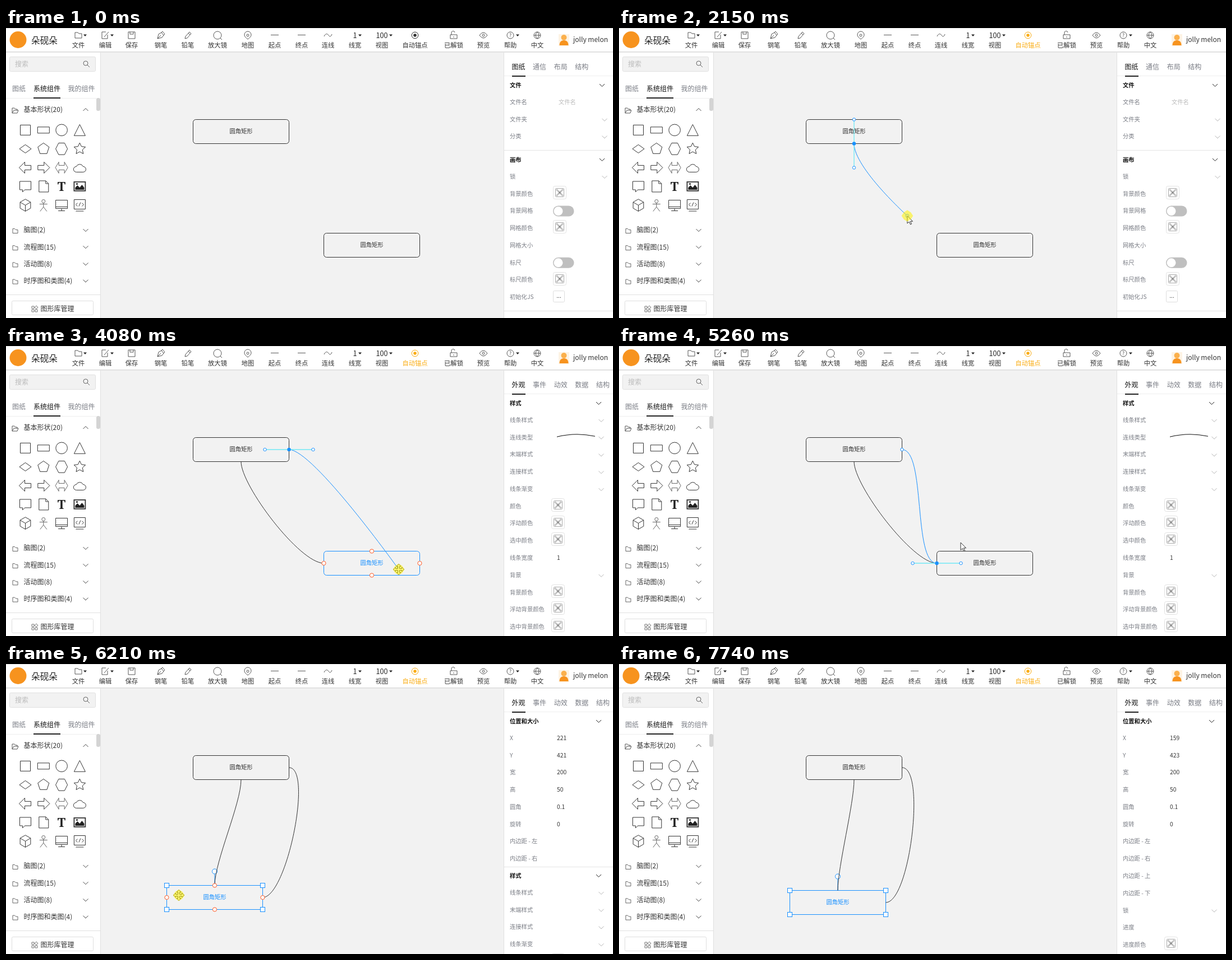
Write an HTML page that moves like this. It is 1082x518 px and loops after 8.75 s.

```html
<!DOCTYPE html>
<html lang="zh-CN">
<head>
<meta charset="utf-8">
<title>自动锚点</title>
<style>
html, body { margin: 0; width: 100%; height: 100%; overflow: hidden; background: #f2f2f2; }
svg { display: block; }
text { stroke: none; white-space: pre; font-family: "Noto Sans CJK SC", "Noto Sans CJK", "Open Sans", sans-serif; }
</style>
</head>
<body>
<svg width="1082" height="518" viewBox="0 0 1082 518" fill="none" stroke="#333">
  <g id="chrome"></g>
  <g id="stage"></g>
</svg>
<script>
const LOOP = 8750, BLUE = '#1890ff', RED = '#ff5a26', ORANGE = '#faad14', DARK = '#333', GREY = '#7a7d85';
const MID = 'text-anchor="middle"', BOLD = 'font-weight="700"';

// Drawing helpers, each returning SVG markup
const path = (d, x = 0, y = 0, extra = '') => `<path d="${d}" transform="translate(${x} ${y})" ${extra}/>`;
const text = (s, x, y, size = 10.3, fill = DARK, extra = '') =>
  `<text x="${x}" y="${y}" dy=".37em" font-size="${size}" fill="${fill}" ${extra}>${s}</text>`;
const rect = (x, y, w, h, fill, stroke = 'none', r = 0) =>
  `<rect x="${x}" y="${y}" width="${w}" height="${h}" rx="${r}" fill="${fill}" stroke="${stroke}"/>`;
const dot = (x, y, r, fill, stroke = 'none') => `<circle cx="${x}" cy="${y}" r="${r}" fill="${fill}" stroke="${stroke}"/>`;
const ring = r => `M${-r} 0a${r} ${r} 0 1 0 ${2 * r} 0a${r} ${r} 0 1 0 ${-2 * r} 0`;
const polygon = (n, rx, ry = rx, inner = 1, turn = -Math.PI / 2) =>
  'M' + Array.from({ length: n }, (_, i) => {
    const a = turn + i * 2 * Math.PI / n, k = i % 2 ? inner : 1;
    return `${(rx * k * Math.cos(a)).toFixed(2)} ${(ry * k * Math.sin(a)).toFixed(2)}`;
  }).join('L') + 'z';
const chevron = (x, y, color = '#222', up = 1) => path(`M-4.5 ${-2 * up}L0 ${2.5 * up}L4.5 ${-2 * up}`, x, y, `stroke="${color}"`);
const caret = x => path('M-3-1.5H3L0 2z', x, 13, 'fill="#222" stroke="none"');

function toolbar() {
  const tools = [
    ['文件', 129, 'M-6 5V-5H-1L1-3H6V5z', 141],
    ['编辑', 177, 'M4-1V6H-6V-6H1M-2 3L6-6', 189],
    ['保存', 224, 'M-6-6H6V6H-6zM-3-6V-2H3V-6'],
    ['钢笔', 276, 'M-6 6L-4-2L1-5L5 0L2 4zM-6 6L0 0M1-5L3-7L7-2L5 0'],
    ['铅笔', 324, 'M-5 6L-4 2L3-6L6-3L-1 5zM1-4L4-1'],
    ['放大镜', 377, ring(7) + 'M5 5L8 8'],
    ['地图', 431, 'M0 7C-4 4-6 2-6-1A6 6 0 0 1 6-1C6 2 4 4 0 7z' + ring(2)],
    ['起点', 479, 'M-7-.5H7'],
    ['终点', 527, 'M-7-.5H7'],
    ['连线', 574, 'M-7 2C-4-5 0-2 1 0S5 4 7-2'],
    ['线宽', 622, '', 631],
    ['视图', 670, '', 686],
    ['已解锁', 798, 'M-6-1H6V6H-6zM-4-1V-4A3 3 0 0 1 2-5M0 2V4'],
    ['预览', 851, 'M-7 0Q0-10 7 0Q0 10-7 0z' + ring(2)],
    ['帮助', 899, ring(6), 912],
    ['中文', 947, ring(6) + 'M-6 0H6M0-6Q-6 0 0 6Q6 0 0-6']
  ];
  return rect(0, 0, 1082, 43, '#fff') + rect(0, 0, 1082, 1, '#dcdcdc') + rect(0, 42, 1082, 1, '#d9d9d9') + rect(0, 43, 1082, 1, '#e8e8e8') +
    dot(21.5, 21, 15, '#f7931e') + text('朵砚朵', 45, 22, 15.7, '#222') +
    tools.map(([label, x, icon, arrow]) => text(label, x, 31.3, 11.3, DARK, MID) +
      path(icon, x, 13, 'stroke="#444" stroke-width=".9"') + (arrow ? caret(arrow) : '')).join('') +
    text('1', 622, 13.5, 12.6, '#222', MID) + text('100', 670, 13.5, 12.6, '#222', MID) + text('?', 899, 13, 8.5, '#444', MID) +
    rect(985, 11, 19, 21, '#fdf3e4') + dot(994.5, 17, 5, '#fbb04c') + path('M-8 10Q-8 1 0 1T8 10z', 994.5, 21, 'fill="#f7931e" stroke="none"') +
    text('jolly melon', 1011, 21, 12);
}

function shapeIcons() {
  const arrow = 'M11 0L1-10V-4H-10V4H1V10z';
  const icons = [
    'M-9-9H9V9H-9z', 'M-10.5-5.5H10.5V5.5H-10.5z', ring(10.3), 'M0-10L10 10H-10z',
    polygon(4, 10.5, 7.5), polygon(5, 10.5), polygon(6, 10.5, 12, 1, 0), polygon(10, 10.8, 10.8, .48),
    arrow, arrow, 'M-11 0L-5-10V-4H5V-10L11 0L5 10V4H-5V10z', 'M-6 8A5 5 0 0 1-6-2A6.5 6.5 0 0 1 6-2A5 5 0 0 1 6 8z',
    'M-10-9H10V6H-1L-5 10V6H-10z', 'M-8-10H4L9-5V10H-8zM4-10V-5H9', '', 'M-10-8H10V8H-10z',
    polygon(6, 10.8) + 'M-9.4-5.4L0 0L9.4-5.4M0 0V10.8', 'M-7-2H7M0-4V3L-6 11M0 3L6 11M-3-7' + 'a3 3 0 1 0 6 0a3 3 0 1 0-6 0',
    'M-10.5-9H10.5V6H-10.5zM-10.5 3H10.5M0 6V10M-6 10H6', 'M-10-10H10V7H-10zM-7 10.5H7M-4-4L-7-1L-4 2M4-4L7-1L4 2M1.5-5L-1.5 2'
  ];
  return icons.map((d, i) => {
    const x = 34.5 + i % 4 * 32.3, y = 182.3 + (i >> 2) * 33.55;
    return i === 8 ? `<g transform="translate(${2 * x} 0) scale(-1 1)">${path(d, x, y)}</g>`
      : path(d, x, y, i === 15 ? 'stroke-width="1.8"' : i === 10 || i === 17 ? 'stroke="#666"' : '');
  }).join('') +
    text('T', 99, 283, 22, '#222', MID + ' style="font-family:Noto Serif,serif" ' + BOLD) +
    path('M-8 6V2L-4-2L0 2L4-3L8 2V6z', 131.4, 283, 'fill="#222" stroke="none"') + dot(126.5, 278.5, 1.6, '#222');
}

function sidebar() {
  const groups = ['脑图(2)', '流程图(15)', '活动图(8)', '时序图和类图(4)'];
  return rect(0, 44, 168, 474, '#fff') + rect(168, 44, 1, 474, '#e0e0e0') +
    rect(6.5, 51.5, 153, 26, '#f2f2f2', '#e0e0e0', 2) + text('搜索', 16, 65, 12, '#bbb') +
    path(ring(4) + 'M3 3L7 7', 142, 63, 'stroke="#666"') +
    text('图纸', 23, 108.5, 12, GREY, MID) + text('系统组件', 73, 108.5, 12, '#111', MID) + text('我的组件', 134.5, 108.5, 12, GREY, MID) +
    rect(0, 125, 161, 1, '#eee') + rect(49, 124, 48, 2, '#222') + rect(161, 125, 7, 23, '#d4d4d4', 'none', 3) +
    path('M-5 5V-4H-1L1-2H4V0M-5 5L-2 0H6L4 5z', 16, 147, 'stroke="#555"') + text('基本形状(20)', 31.5, 146, 12) + chevron(142, 146, '#444', -1) +
    shapeIcons() +
    groups.map((s, i) => {
      const y = 361 + i * 30.2;
      return path('M-4.5 4V-4H-1L1-2H4.5V4z', 16.5, y + 1.5, 'stroke="#666"') + text(s, 31.5, y, 12) + chevron(142, y, '#444');
    }).join('') +
    rect(0, 476, 168, 1, '#e0e0e0') + rect(10.5, 487.5, 145, 25, '#fff', '#dedede', 2) +
    path('M-5-5H-1V-1H-5zM-5 1H-1V5H-5zM1 1H5V5H1zM3-6L6-3L3 0L0-3z', 51, 502, 'stroke="#666" stroke-width=".9"') +
    text('图形库管理', 61.5, 502, 12);
}

// Right panel: each row is [label, widget]; widgets: > chevron, # swatch, o switch, . button, ~ curve, else a value
const PITCH = 30.77;
const swatch = (x, y) => rect(x + .5, y - 13.5, 23, 23, '#fff', '#e2e2e2', 3) + rect(x + 4.5, y - 9.5, 15, 15, '#fff', '#aaa', 1) +
  path('M-6-6L6 6M6-6L-6 6', x + 12, y - 2, 'stroke="#c4c4c4" stroke-width="3"') + path('M-2-2L2 2M2-2L-2 2', x + 12, y - 2, 'stroke="#777"');
function section(title, list, y, wide) {
  const left = wide ? 975 : 972, end = wide ? 1067 : 1061;
  const widgets = {
    '>': v => chevron(end, v + 1, '#b5b5b5'),
    '#': v => swatch(left, Math.round(v)),
    'o': v => rect(975, v - 9, 37.5, 19, '#bfbfbf', 'none', 9.5) + dot(984.5, v + .5, 8, '#fff'),
    '.': v => rect(975.5, Math.round(v) - 10.5, 20, 20, '#fff', '#ddd', 2) + text('...', 985.5, v - 2, 10, DARK, MID),
    '~': v => path('M982 0Q1016-8.5 1050-1', 0, v - .5, 'stroke="#111" stroke-width="1.2"') + chevron(end, v + 1, '#b5b5b5')
  };
  return text(title, 898, y, 10.3, '#111', BOLD) + chevron(end - 4.5, y, '#222') + list.map(([label, w = ''], i) => {
    const v = y + 30 + i * PITCH;
    return text(label, 898, v, 10.3, GREY) + (widgets[w] ? widgets[w](v) : text(w, wide ? 985 : 982, v, 10.3, wide ? '#bbb' : DARK));
  }).join('');
}
const rows = s => s.split(' ').map(r => r.split(':').map(c => c.replace(/_/g, ' ')));
const FILE = rows('文件名:文件名 文件夹:> 分类:>');
const CANVAS = rows('锁:> 背景颜色:# 背景网格:o 网格颜色:# 网格大小 标尺:o 标尺颜色:# 初始化JS:.');
const COLORS = ' 连接样式:> 线条渐变:> 颜色:# 浮动颜色:# 选中颜色:# 线条宽度:1 背景:> 背景颜色:# 浮动背景颜色:# 选中背景颜色:#';
const LINE = rows('线条样式:> 连线类型:~ 末端样式:>' + COLORS);
const STYLE = rows('线条样式:> 末端样式:>' + COLORS);
const PADDING = rows('宽:200 高:50 圆角:0.1 旋转:0 内边距_-_左 内边距_-_右 内边距_-_上 内边距_-_下 锁:> 进度 进度颜色:#');

function panel(t) {
  const tabs = (t < 2560 ? '图纸 通信 布局 结构' : '外观 事件 动效 数据 结构').split(' ');
  let body;
  if (t < 2560) {
    body = section('文件', FILE, 102, true) + rect(888, 218, 194, 1, '#e4e4e4') +
      section('画布', CANVAS, 235, true) + rect(888, 505, 194, 1, '#e4e4e4');
  } else if (t < 5870) {
    body = section('样式', LINE, 102);
  } else {
    const [x, y] = along(BOX_TRACK, Math.min(t, 6730));
    const top = Math.round(117 + Math.max(0, t - 6033) * 1.57);
    body = section('位置和大小', [['X', Math.round((x - 96.4) / .857)], ['Y', Math.round((y - 34.2) / .857)], ...PADDING], 102) +
      (top < 518 ? rect(888, top, 194, 518, '#fff') + rect(888, top, 194, 1, '#e4e4e4') + section('样式', STYLE, top + 16) : '');
  }
  return rect(887, 44, 195, 474, '#fff') + rect(887, 44, 1, 474, '#e0e0e0') + body + rect(888, 85, 194, 1, '#eee') +
    tabs.map((s, i) => text(s, 913.5 + i * 37.6, 69.3, 12, i ? GREY : '#111', MID)).join('') + rect(902, 85, 24, 2, '#222');
}

// Motion: [time, x, y] points, and bursts of [start, end, steps] in which the screen refreshes
const POINTER_TRACK = [[70, 917, 280], [300, 775, 80], [460, 729, 20], [610, 729, 20], [1100, 560, 150], [1320, 432, 232],
  [1470, 421, 207], [1700, 421, 207], [2000, 478, 300], [2380, 567, 388], [2560, 567, 388], [2865, 508, 228], [3170, 505, 186],
  [3550, 508, 188], [3780, 660, 380], [3854, 690, 402], [3930, 692, 413], [4080, 700, 399], [4260, 706, 390], [4800, 700, 380],
  [5029, 512, 178], [5258, 609, 351], [5411, 630, 385], [5640, 637, 390], [5800, 637, 390], [5878, 625, 391], [6111, 357, 417],
  [6189, 308, 413], [6344, 274, 420], [6500, 304, 421], [6730, 376, 429], [7659, 376, 429], [7660, 572, 469]];
const BOX_TRACK = [[5878, 566, 366.5], [6111, 375, 386], [6189, 286, 395.4], [6422, 203, 396], [6500, 203, 397], [6730, 233, 397], [6810, 304.8, 404.8]];
const BURSTS = [[70, 460, 6], [610, 1470, 12], [1700, 2380, 10], [2560, 3170, 9], [3550, 3930, 6], [4080, 4260, 3], [4410, 4410, 1],
  [4800, 5640, 12], [5800, 6500, 10], [6730, 6810, 2], [7430, 7430, 1], [7660, 7740, 2]];

function along(track, t) {
  const i = track.findIndex(p => p[0] > t);
  if (i < 1) return (i ? track[track.length - 1] : track[0]).slice(1);
  const [a, b] = [track[i - 1], track[i]], k = (t - a[0]) / (b[0] - a[0]);
  return [1, 2].map(j => a[j] + (b[j] - a[j]) * k);
}
function lastRefresh(t) {
  const burst = BURSTS.filter(b => b[0] <= t).pop();
  if (!burst) return 0;
  const [start, end, n] = burst;
  if (n === 1) return start;
  const step = (end - start) / (n - 1);
  return start + step * Math.min(n - 1, Math.floor((t - start) / step + .15));
}

const W = 171, H = 43, REACH = 43;
const SIDES = [[0, -1], [1, 0], [0, 1], [-1, 0]];
const anchor = ([x, y], side) => [x + W / 2 * (1 + SIDES[side][0]), y + H / 2 * (1 + SIDES[side][1])];
const reach = ([x, y], side, k = REACH) => [x + SIDES[side][0] * k, y + SIDES[side][1] * k];
const distance = (a, b) => Math.hypot(a[0] - b[0], a[1] - b[1]);

function node([x, y], hovered, selected) {
  const color = hovered || selected ? BLUE : DARK;
  return rect(x, y, W, H, 'none', selected ? 'none' : color, 5) + text('圆角矩形', x + W / 2, y + 20.5, 10.3, color, MID);
}
function selection([x, y]) {
  const cx = x + W / 2;
  return path(`M${cx} ${y - 20}V${y}`, 0, 0, `stroke="${BLUE}"`) + rect(x, y, W, H, 'none', BLUE) + dot(cx, y - 25, 4.5, '#fff', BLUE) +
    [x, x + W].map(u => [y, y + H].map(v => rect(u - 4, v - 4, 8, 8, '#fff', BLUE)).join('')).join('');
}
function cable(t, boxes, mouse, side, born, dropped, idle) {
  if (t < born) return '';
  const free = t < dropped, active = t < idle, a = anchor(boxes[0], side);
  const ends = [0, 1, 2, 3].sort((i, j) => distance(a, anchor(boxes[1], i)) - distance(a, anchor(boxes[1], j)));
  const b = free ? mouse : anchor(boxes[1], ends[0]);
  const c = free ? mouse : reach(b, ends[0]);
  const curve = path(`M${a}C${reach(a, side)} ${c} ${b}`, 0, 0, `stroke="${active ? BLUE : DARK}"`);
  if (!active) return curve;
  const [p, s, q] = free ? [a, side, b] : [b, ends[0], a];
  const grips = [reach(p, s), reach(p, s, -REACH)];
  return curve + path(`M${grips[0]}L${grips[1]}`, 0, 0, 'stroke="#6fe9f5" stroke-width="1.3"') +
    [...grips, q].map(([x, y]) => dot(x, y, 2.7, '#fff', BLUE)).join('') + dot(...p, 3.2, BLUE);
}
function pointer(mouse, kind, pressed) {
  const shapes = {
    arrow: ['M0 0V13.5L3.3 10.6L5.6 15.5L7.6 14.5L5.4 9.8H9.6z', 'fill="#fff"'],
    cross: ['M-8 0H8M0-8V8', 'stroke="#000" stroke-width="2"'],
    move: ['M0-9.5L4-5.5H1.5V-1.5H5.5V-4L9.5 0L5.5 4V1.5H1.5V5.5H4L0 9.5L-4 5.5H-1.5V1.5H-5.5V4L-9.5 0L-5.5-4V-1.5H-1.5V-5.5H-4z', 'fill="#fff"']
  };
  const [d, style] = shapes[kind];
  return path(d, ...mouse, style) + (pressed ? path(polygon(8, 10.3, 10.3, .85), ...mouse, 'fill="rgba(255,242,0,.55)" stroke="none"') : '');
}

function scene(t) {
  const mouse = along(POINTER_TRACK, t);
  const boxes = [[333.5, 163.5], along(BOX_TRACK, t).map(v => Math.floor(v) + .5)];
  const within = (a, b) => t >= a && t < b;
  const pressed = within(610, 680) || within(1700, 2560) || within(3550, 4410) || within(5800, 7430);
  const hovered = boxes.map(([x, y], i) => t >= 70 && (i === 1 && within(5800, 7430) ||
    mouse[0] > x - 2 && mouse[0] < x + W + 2 && mouse[1] > y - 2 && mouse[1] < y + H + 2));
  const selected = t >= 5800;
  let kind = hovered.includes(true) ? 'move' : 'arrow', anchors = '';
  boxes.forEach((box, i) => {
    if (hovered[i]) SIDES.forEach((_, side) => {
      const a = anchor(box, side), hit = !selected && distance(a, mouse) < 6;
      if (hit) kind = 'cross';
      anchors += dot(...a, 3.6, hit ? RED : '#fff', RED);
    });
  });
  const accent = t >= 380 ? ORANGE : DARK;
  return path(ring(5.8), 729, 13, `stroke="${accent}"`) + dot(729, 13, 2.8, accent) + text('自动锚点', 729, 31.3, 11.3, accent, MID) +
    panel(t) + boxes.map((b, i) => node(b, hovered[i], i === 1 && selected)).join('') +
    (selected ? selection(boxes[1]) : '') +
    cable(t, boxes, mouse, 2, 1700, 2560, 3550) + cable(t, boxes, mouse, 1, 3550, 4410, 5800) +
    anchors + (within(70, 7735) ? pointer(mouse, kind, pressed) : '');
}

const stage = document.getElementById('stage');
document.getElementById('chrome').innerHTML = toolbar() + sidebar();
let shown = -1;
function tick() {
  const t = lastRefresh(performance.now() % LOOP);
  if (t !== shown) stage.innerHTML = scene(shown = t);
  requestAnimationFrame(tick);
}
tick();
</script>
</body>
</html>
```
